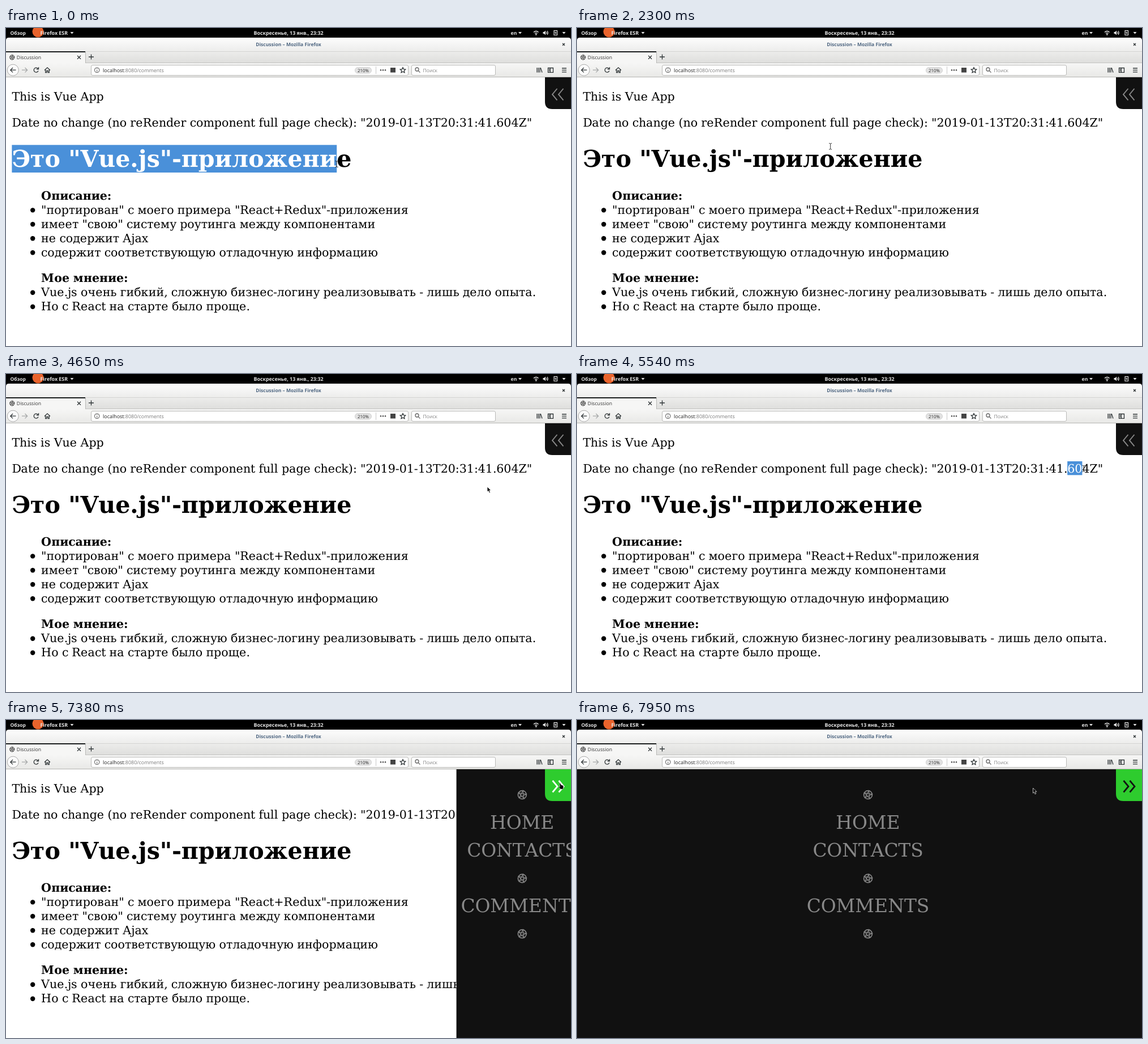
An HTML page that plays this animation: 998 by 561 pixels, repeating every 7990 ms.

```html
<!DOCTYPE html>
<html lang="ru">
<head>
<meta charset="utf-8">
<title>Discussion</title>
<style>
html, body { margin: 0; width: 100%; height: 100%; overflow: hidden; background: #fff; }
svg { display: block; width: 998px; height: 561px; text-rendering: geometricPrecision; }
text { white-space: pre; }
.serif { font-family: "DejaVu Serif", "Noto Serif", serif; }
.ui .bold { font-weight: 700; }
.ui text { font-family: "Open Sans", "Noto Sans", sans-serif; font-size: 8.7px; }
.icon { fill: none; stroke: #2e3436; stroke-width: 1.3; }
.light { fill: #e4e4e4; }
</style>
</head>
<body>
<svg viewBox="0 0 998 561">
  <defs>
    <linearGradient id="strip" x2="0" y2="1">
      <stop offset="0" stop-color="#fdfdfd"/><stop offset="1" stop-color="#dededc"/>
    </linearGradient>
    <linearGradient id="bar" x2="0" y2="1">
      <stop offset="0" stop-color="#f6f6f5"/><stop offset="1" stop-color="#e8e8e6"/>
    </linearGradient>
    <clipPath id="panelClip"><rect id="panelBox" y="87" width="998" height="474"/></clipPath>
    <clipPath id="topClip"><rect width="998" height="17"/></clipPath>
    <path id="caret" d="M-3-1.5H3L0 2Z"/>
    <g id="star" fill="none" stroke="currentColor">
      <circle r="7.4" stroke-width="1.7"/>
      <path id="starLines" stroke-width="1.2"/>
    </g>
  </defs>

  <rect width="998" height="561" fill="#fff"/>
  <g id="page"></g>

  <g id="menu" clip-path="url(#panelClip)">
    <rect y="87" width="998" height="474" fill="#111"/>
    <g id="items" color="#888" fill="#888">
      <use href="#star" y="132"/>
      <use href="#star" y="279.5"/>
      <use href="#star" y="377.3"/>
    </g>
  </g>
  <path id="button" d="M952 87H998V143H965Q952 143 952 130Z"/>
  <path id="chevrons" fill="none"/>

  <g class="ui">
    <rect width="998" height="24" fill="#000"/>
    <path d="M0 62V22Q0 17 5 17H993Q998 17 998 22V62Z" fill="url(#strip)"/>
    <path d="M0 41.5H998" stroke="#d4d4d2"/>
    <rect y="62" width="998" height="25" fill="url(#bar)"/>
    <path d="M140 61.5H998" stroke="#c2c2c0"/>
    <path d="M0 86.5H998" stroke="#b4b4b2"/>
    <rect y="42" width="140" height="20" fill="#f6f6f5"/>
    <rect y="41" width="140" height="2" fill="#1c1f20"/>
    <path d="M140.5 42V62" stroke="#b8b8b6"/>

    <circle cx="56.5" cy="6.5" r="10" fill="#e9632c" clip-path="url(#topClip)"/>
    <g class="light bold">
      <text x="7.5" y="12" style="font-size:8.5px">Обзор</text>
      <text x="60.5" y="12" style="font-size:8.9px">Firefox ESR</text>
      <text x="499" y="12" text-anchor="middle" style="font-size:8.9px">Воскресенье, 13 янв., 23:32</text>
      <text x="891.5" y="12">en</text>
    </g>
    <g class="light">
      <use href="#caret" x="116.5" y="8.5"/>
      <use href="#caret" x="908" y="8.5"/>
      <use href="#caret" x="985.5" y="8.5"/>
      <path d="M948.5 7H950.5L953 4.5V12.5L950.5 10H948.5Z"/>
      <circle cx="936.3" cy="11.5" r="1.3"/>
      <path d="M970.7 6L969 8.8H970.5L970 11.5L972.7 8H971Z"/>
    </g>
    <g fill="none" stroke="#e4e4e4" stroke-width="1.2">
      <path d="M932 7.5Q936.3 3.5 940.6 7.5M934 9.6Q936.3 7.5 938.6 9.6"/>
      <path d="M954.5 6.5Q956 8.5 954.5 10.5M956 5Q958.5 8.5 956 12"/>
      <path d="M968 4.7H973.5V12.5H968Z"/>
    </g>

    <text class="bold" x="499" y="32.3" text-anchor="middle" fill="#4d6580" style="font-size:8.52px">Discussion – Mozilla Firefox</text>
    <path d="M983 27L987 31M987 27L983 31" class="icon" stroke-width="1.5"/>
    <use href="#star" transform="translate(10.8 51.8) scale(.56)" color="#222"/>
    <text x="18.8" y="55.3" fill="#333">Discussion</text>
    <path class="icon" d="M126 48.8L132 54.8M132 48.8L126 54.8M146 51H155M150.5 46.5V55.5"/>

    <circle cx="12.3" cy="74.2" r="10" fill="#fbfbfb" stroke="#aaa"/>
    <path class="icon" d="M17.5 74.2H8M12 70L7.8 74.2L12 78.4"/>
    <path class="icon" style="stroke:#a5a7a7" d="M28 74.2H37.5M33.5 70L37.7 74.2L33.5 78.4"/>
    <path class="icon" d="M56.5 71.8A4 4 0 1 0 57 75.5M57.5 69V72.6H53.8"/>
    <path class="icon" d="M68 74.5L73 69.8L78 74.5M69.7 73.5V78.7H71.8V75.5H74.2V78.7H76.3V73.5"/>

    <g fill="#fff" stroke="#b9b9b7">
      <rect x="150.5" y="65.5" width="560" height="18" rx="2.5"/>
      <rect x="716.5" y="65.5" width="148" height="18" rx="2.5"/>
    </g>
    <circle class="icon" style="stroke:#777" cx="160.7" cy="74.3" r="4.2"/>
    <path class="icon" style="stroke:#777" d="M160.7 73.7V76.8M160.7 71.5V72.6"/>
    <text x="171" y="77.7" fill="#222" style="font-size:8.95px">localhost<tspan fill="#7c7c7c">:8080/comments</tspan></text>
    <rect x="616.5" y="69.5" width="29" height="10.5" rx="5.2" fill="#e3e3e3" stroke="#cfcfcf"/>
    <text x="631" y="77.6" text-anchor="middle" fill="#222" style="font-size:7.8px">210%</text>
    <path d="M653.5 67.5V81" stroke="#c8c8c8"/>
    <g fill="#444">
      <circle cx="662" cy="74.3" r="1.2"/><circle cx="666" cy="74.3" r="1.2"/><circle cx="670" cy="74.3" r="1.2"/>
      <rect x="679" y="70" width="9" height="8.5"/>
    </g>
    <path class="icon" id="bookmark"/>
    <circle class="icon" style="stroke:#666" cx="726" cy="73" r="3"/>
    <path class="icon" style="stroke:#666" d="M728.2 75.3L731.5 78.6"/>
    <text x="736.5" y="77.7" fill="#858585" style="font-size:8.6px">Поиск</text>
    <path class="icon" d="M938 70V78.5M940.5 70V78.5M943 70V78.5M944.3 70.3L947 78.5"/>
    <path class="icon" d="M957.5 70.5H966.5V78.3H957.5ZM961.3 70.5V78.3M958.8 73H960.5M958.8 75.5H960.5"/>
    <path class="icon" d="M982 71H990M982 74.3H990M982 77.6H990"/>
  </g>

  <g id="arrow"><path d="M0 0V9L2 7.2L3.6 10.8L5.3 10L3.7 6.7L6.4 6.4Z" fill="#000" stroke="#fff" stroke-width=".7"/></g>
  <g id="beam" fill="none">
    <path id="beamLine" d="M-2.5-5.5Q0-5.5 0-4V4Q0 5.5-2.5 5.5M2.5-5.5Q0-5.5 0-4M0 4Q0 5.5 2.5 5.5" stroke="#222" stroke-width=".9"/>
  </g>
  <g id="hand"><path d="M-1.5-3Q-.5-4 .5-2.8L1.5-.5L4.8.5Q6 1 5.8 3L5 7H.5L-2.5 3Q-2.5 1.5-.5 2.5Z" fill="#000" stroke="#fff" stroke-width=".5"/></g>
</svg>
<script>
const LOOP = 7990;
const SCALE = 998 / 1600;
const LEFT = 10.4, INDENT = 62.1;
const $ = id => document.getElementById(id);
const setAll = (el, attrs) => { for (const k in attrs) el.setAttribute(k, attrs[k]); };

function make(parent, tag, attrs, content) {
  const el = document.createElementNS('http://www.w3.org/2000/svg', tag);
  setAll(el, attrs);
  if (content) el.textContent = content;
  return parent.appendChild(el);
}

// Hinted desktop text: every glyph advances by whole desktop pixels.
const pen = document.createElement('canvas').getContext('2d');
function advances(content, px, weight) {
  pen.font = `${weight} ${px * 10}px "DejaVu Serif", "Noto Serif", serif`;
  const xs = [0];
  for (const c of content) xs.push(xs[xs.length - 1] + Math.round(pen.measureText(c).width / 10) * SCALE);
  return xs;
}

function serif(parent, content, x, y, { px = 33, weight = 400, align = 0, ...attrs } = {}) {
  const xs = advances(content, px, weight);
  const start = x - align * xs[content.length];
  const edges = xs.map(v => start + v);
  make(parent, 'text', {
    class: 'serif', x: edges.slice(0, -1).join(' '), y,
    'font-size': px * SCALE, 'font-weight': weight, ...attrs
  }, content);
  return edges;
}

// Five-pointed shapes: a crossing star and an outlined one.
const spoke = (cx, cy, r, turn) => {
  const a = (turn - 0.25) * 2 * Math.PI;
  return (cx + r * Math.cos(a)).toFixed(2) + ' ' + (cy + r * Math.sin(a)).toFixed(2);
};
const star = (n, point) => 'M' + Array.from({ length: n }, (_, i) => point(i)).join('L') + 'Z';
$('starLines').setAttribute('d', star(5, i => spoke(0, 0, 7.2, i * 0.4 + 0.03)));
$('bookmark').setAttribute('d', star(10, i => spoke(701, 74.6, i % 2 ? 2.4 : 5, i / 10)));

const page = $('page');

// A line of text with a highlight that can cover any run of its characters.
function selectable(id, content, y, top, height, style) {
  const edges = serif(page, content, LEFT, y, style);
  const box = make(page, 'rect', { y: top, height, fill: '#4a90d9' });
  const clip = make(make(page, 'clipPath', { id }), 'rect', { y: top, height });
  const lit = make(page, 'g', { 'clip-path': `url(#${id})` });
  serif(lit, content, LEFT, y, { ...style, fill: '#fff' });
  return (from, to) => {
    for (const r of [box, clip]) setAll(r, { x: edges[from], width: edges[to] - edges[from] });
  };
}

const dateLine = 'Date no change (no reRender component full page check): "2019-01-13T20:31:41.604Z"';
const heading = 'Это "Vue.js"-приложение';
serif(page, 'This is Vue App', LEFT, 127.8);
const selectDate = selectable('dateSel', dateLine, 173.6, 154, 24.3);
const selectHead = selectable('headSel', heading, 245.3, 206.3, 48.7, { px: 66, weight: 700 });

function list(y, title, items) {
  serif(page, title, INDENT, y, { weight: 700 });
  items.forEach((item, i) => {
    const base = y + 24.95 * (i + 1);
    make(page, 'circle', { cx: 47.2, cy: base - 6.3, r: 4.2 });
    serif(page, item, INDENT, base);
  });
}
list(302.7, 'Описание:', [
  '"портирован" с моего примера "React+Redux"-приложения',
  'имеет "свою" систему роутинга между компонентами',
  'не содержит Ajax',
  'содержит соответствующую отладочную информацию'
]);
list(448.1, 'Мое мнение:', [
  'Vue.js очень гибкий, сложную бизнес-логину реализовывать - лишь дело опыта.',
  'Но с React на старте было проще.'
]);

const menuStyle = { px: 52.8, align: 0.5 };
serif($('items'), 'HOME', 0, 192, menuStyle);
serif($('items'), 'CONTACTS', 0, 240.5, menuStyle);
serif($('items'), 'COMMENTS', 0, 339, menuStyle);

// Pointer path: time, x, y.
const path = [
  [0, 584, 240], [60, 584, 240], [160, 636, 242], [330, 636, 242], [450, 765, 244],
  [610, 962, 238], [1030, 962, 238], [1270, 858, 225], [1770, 858, 225], [1930, 660, 206],
  [2050, 496, 213], [2220, 496, 213], [3030, 12, 171], [3070, 12, 171], [3340, 324, 161],
  [3580, 514, 190], [4190, 514, 190], [4510, 850, 199], [4650, 850, 199], [4930, 872, 167.5],
  [5220, 872, 167.5], [5640, 902, 166.5], [6250, 902, 166.5], [6570, 959, 239],
  [7050, 979, 115], [7610, 979, 115], [7950, 805.5, 120]
];
const shapes = [[0, 'beam'], [120, 'arrow'], [1990, 'beam'], [3460, 'arrow'], [4850, 'beam'],
  [6330, 'arrow'], [6930, 'hand'], [7680, 'arrow']];
const dragged = [[3070, 0], [3340, 11], [3460, 45], [3580, dateLine.length]];

function along(keys, t) {
  const i = keys.findIndex(k => k[0] > t);
  if (i < 0) return keys[keys.length - 1].slice(1);
  const a = keys[i - 1], b = keys[i], p = (t - a[0]) / (b[0] - a[0]);
  return a.slice(1).map((v, j) => v + (b[j + 1] - v) * p);
}

// The standard CSS "ease" curve.
function ease(p) {
  if (p <= 0) return 0;
  if (p >= 1) return 1;
  const bez = (a, b, s) => 3 * a * s * (1 - s) ** 2 + 3 * b * s * s * (1 - s) + s ** 3;
  let lo = 0, hi = 1;
  for (let i = 0; i < 20; i++) {
    const mid = (lo + hi) / 2;
    if (bez(0.25, 0.25, mid) < p) lo = mid; else hi = mid;
  }
  return bez(0.1, 1, lo);
}

function drawSelections(t) {
  selectHead(0, t < 70 ? heading.length - 1 : t < 1450 ? heading.length : 0);
  const ms = dateLine.indexOf('604');
  if (t >= 3070 && t < 4650) selectDate(0, Math.floor(along(dragged, t)[0] + 0.01));
  else if (t >= 5260) selectDate(ms, ms + Math.min(3, 1 + Math.floor((t - 5260) / 150)));
  else selectDate(0, 0);
}

function drawMenu(t) {
  const open = t >= 7210, hover = t >= 6930 && t < 7680;
  const painted = Math.floor((t - 7250) / 90) * 90; // the sliding panel repaints every 90 ms
  const left = 998 * (1 - ease((painted + 5) / 600));
  $('menu').style.display = open ? '' : 'none';
  setAll($('panelBox'), { x: left });
  setAll($('items'), { transform: `translate(${left / 2 + 514} 0)` });
  setAll($('button'), { fill: open ? '#2ecc2e' : '#111' });
  setAll($('chevrons'), {
    d: open ? 'M965.5 107L974 117.2L965.5 127.4M976.5 107L985 117.2L976.5 127.4'
            : 'M973.5 107L965 117.2L973.5 127.4M984.5 107L976 117.2L984.5 127.4',
    stroke: hover ? '#fff' : open ? '#111' : '#888',
    'stroke-width': open ? 2.8 : 1.9
  });
}

function drawPointer(t) {
  const [x, y] = along(path, t);
  const shape = shapes.filter(s => s[0] <= t).pop()[1];
  for (const id of ['arrow', 'beam', 'hand'])
    setAll($(id), { display: id === shape ? 'inline' : 'none', transform: `translate(${x} ${y})` });
}

function frame() {
  const t = performance.now() % LOOP;
  drawSelections(t);
  drawMenu(t);
  drawPointer(t);
  requestAnimationFrame(frame);
}
frame();
</script>
</body>
</html>
```
